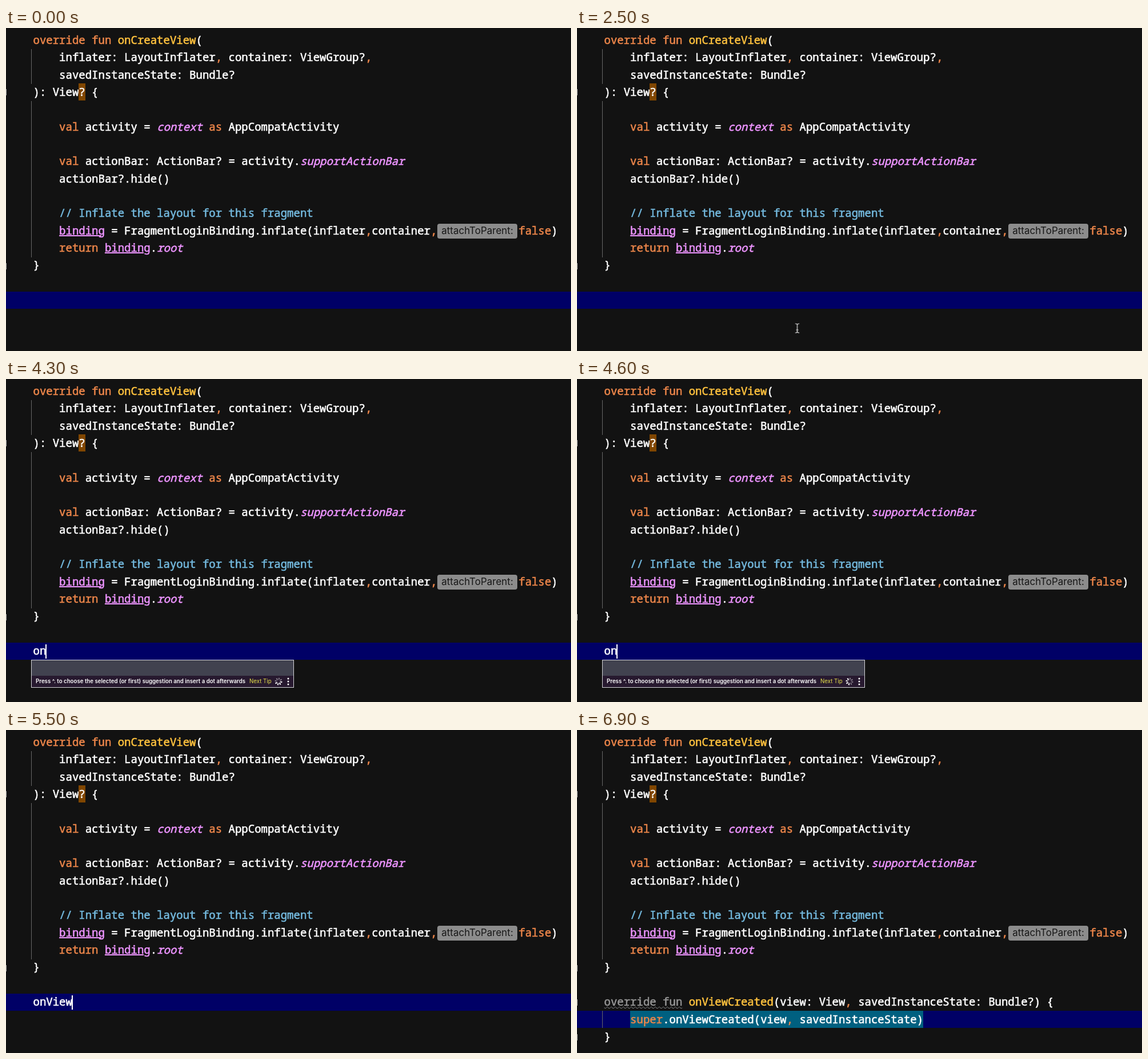
Animation, 989 px wide and 566 px high, one loop 7 s. Source, as an HTML page:

```html
<!DOCTYPE html>
<html lang="en">
<head>
<meta charset="utf-8">
<title>Typing an override</title>
<style>
  :root { --line: 30.35px; --x: 47.5px; --loop: 7s; }
  html, body { margin: 0; width: 100%; height: 100%; overflow: hidden; background: #121212; }
  #stage { position: relative; width: 989px; height: 566px; overflow: hidden; background: #121212; color: #fff; }
  #stage div, pre, .hint { position: absolute; }
  pre, .typed {
    left: var(--x); margin: 0; white-space: pre;
    font: 500 19px/var(--line) "Noto Sans Mono", "DejaVu Sans Mono", monospace;
    font-variant-ligatures: none;
    -webkit-text-stroke: .6px currentColor;
  }
  pre { top: 6px; }
  b { font-weight: inherit; color: #ed864a; }
  i { color: #ed94ff; }
  u { color: #ed94ff; text-decoration-thickness: 1.5px; text-underline-offset: 1px; }
  em { font-style: normal; color: #ffc23e; }
  s { color: #969696; text-decoration: underline wavy #8c8c8c 1px; text-underline-offset: 1px; }
  q { quotes: none; color: #74badf; }
  .match { display: inline-block; height: var(--line); vertical-align: top; background: #804600; }
  .hint {
    left: 755px; top: 343px; width: 140px; height: 26px; border-radius: 4px;
    background: #8c8c8c; color: #161616; text-align: center; white-space: nowrap;
    font: 400 17px/25px Inter, "Liberation Sans", sans-serif;
  }
  .late { left: 897.3px; top: 339.85px; }
  .guide { left: 43.5px; width: 1px; background: #666; }
  .fold { left: -6px; width: 5px; height: 9px; border: 1px solid #aaa; }
  .row { left: 0; width: 100%; height: 30px; background: #000066; }
  .sel { left: 93px; top: 492px; width: 513px; height: 30px; background: #006080; }

  .before, .after { inset: 0; }
  .before { animation: before var(--loop) step-end infinite; }
  .after { animation: after var(--loop) step-end infinite; }
  @keyframes before { 0% { visibility: visible } 81.4%, 100% { visibility: hidden } }
  @keyframes after { 0% { visibility: hidden } 81.4%, 100% { visibility: visible } }

  .typed, .added { top: 461.25px; }
  .typed::before { content: ""; animation: type var(--loop) step-end infinite; }
  .typed::after, .last { position: absolute; width: 2px; height: 25px; background: #fff; }
  .typed::after {
    content: ""; right: -1px; top: 4px;
    animation: blink var(--loop) step-end infinite;
  }
  @keyframes type {
    0% { content: "" }
    57.1% { content: "o" }
    59.9% { content: "on" }
    68.5% { content: "onV" }
    71.4% { content: "onVi" }
    77.1% { content: "onVie" }
    78.5%, 100% { content: "onView" }
  }
  @keyframes blink {
    0% { opacity: 0 }
    42.8% { opacity: 1 }
    50% { opacity: 0 }
    57.1%, 100% { opacity: 1 }
  }
  .last { left: 92px; top: 495px; animation: rest var(--loop) step-end infinite; }
  @keyframes rest { 0% { opacity: 1 } 91.4%, 100% { opacity: 0 } }

  .popup {
    left: 43.5px; top: 491.5px; width: 458.5px; height: 47px; border: 1px solid #d4d4d8;
    background: linear-gradient(#41424f 27px, #27192f 27px);
    font: 600 9.7px/20px Inter, "Liberation Sans", sans-serif; white-space: nowrap;
    animation: popup var(--loop) step-end infinite;
  }
  .popup span { position: absolute; top: 27px; left: 7.5px; }
  .popup .next { left: 381.5px; color: #e6e04a; font-weight: 400; }
  .popup svg { position: absolute; left: 424px; top: 29px; }
  .spin { transform-origin: 8px 8px; animation: spin 1s steps(8) infinite; }
  @keyframes popup { 0% { opacity: 0 } 59.9% { opacity: 1 } 71.4%, 100% { opacity: 0 } }
  @keyframes spin { to { transform: rotate(360deg) } }

  .mouse { left: 0; top: 0; animation: move var(--loop) infinite, show var(--loop) step-end infinite; }
  .mouse svg { position: absolute; overflow: visible; }
  .beam { animation: beam var(--loop) step-end infinite; }
  .arrow { animation: arrow var(--loop) step-end infinite; }
  @keyframes move {
    0%, 31.4% { transform: translate(420px, 536px); animation-timing-function: ease-in-out }
    42.8% { transform: translate(305px, 503px); animation-timing-function: ease-out }
    47% { transform: translate(290px, 486px) }
    85% { transform: translate(290px, 486px); animation-timing-function: ease-out }
    88.4% { transform: translate(401px, 521px) }
    90% { transform: translate(401px, 521px); animation-timing-function: ease-in }
    95.7%, 100% { transform: translate(440px, 580px) }
  }
  @keyframes show {
    0% { opacity: 0 }
    31.4% { opacity: 1 }
    57.1% { opacity: 0 }
    85% { opacity: 1 }
    95.7%, 100% { opacity: 0 }
  }
  @keyframes beam { 0% { opacity: 1 } 85.6% { opacity: 0 } 91.4%, 100% { opacity: 1 } }
  @keyframes arrow { 0% { opacity: 0 } 85.6% { opacity: 1 } 91.4%, 100% { opacity: 0 } }
</style>
</head>
<body>
<div id="stage">
  <div class="guide" style="top:37px;height:61px"></div>
  <div class="guide" style="top:128px;height:274px"></div>
  <div class="fold" style="top:107px"></div>
  <div class="fold" style="top:412px"></div>
<pre><b>override fun</b> <em>onCreateView</em>(
    inflater: LayoutInflater<b>,</b> container: ViewGroup?<b>,</b>
    savedInstanceState: Bundle?
): View<span class="match">?</span> {

    <b>val</b> activity = <i>context</i> <b>as</b> AppCompatActivity

    <b>val</b> actionBar: ActionBar? = activity.<i>supportActionBar</i>
    actionBar?.hide()

    <q>// Inflate the layout for this fragment</q>
    <u>binding</u> = FragmentLoginBinding.inflate(inflater<b>,</b>container<b>,</b>
    <b>return</b> <u>binding</u>.<i>root</i>
}</pre>
  <span class="hint">attachToParent:</span>
  <pre class="late"><b>false</b>)</pre>

  <div class="before">
    <div class="row" style="top:462px"></div>
    <div class="typed">&#8203;</div>
    <div class="popup">
      <span>Press ^. to choose the selected (or first) suggestion and insert a dot afterwards</span>
      <span class="next">Next Tip</span>
      <svg width="32" height="16" fill="none" stroke="#fff">
        <g class="spin" stroke-width="3.6" stroke-dasharray="1 1">
          <circle cx="8" cy="8" r="4.6" pathLength="16" opacity=".45"/>
          <path d="M8 3.4A4.6 4.6 0 0 1 8 12.6" pathLength="8"/>
        </g>
        <path d="M25 3h.01M25 8h.01M25 13h.01" stroke-width="3" stroke-linecap="round"/>
      </svg>
    </div>
  </div>

  <div class="after">
    <div class="row" style="top:492px"></div>
    <div class="sel"></div>
    <div class="guide" style="top:492px;height:30px"></div>
    <div class="fold" style="top:472px"></div>
    <div class="fold" style="top:533px"></div>
<pre class="added"><s>override fun</s> <em>onViewCreated</em>(view: View<b>,</b> savedInstanceState: Bundle?) {
    <b>super</b>.onViewCreated(view<b>,</b> savedInstanceState)
}</pre>
    <div class="last"></div>
  </div>

  <div class="mouse">
    <svg class="beam" width="1" height="1" fill="none">
      <defs><path id="ibeam" d="M-3.5-8Q0-8 0-5.5V5.5Q0 8-3.5 8M3.5-8Q0-8 0-5.5V5.5Q0 8 3.5 8M-2 3H2"/></defs>
      <use href="#ibeam" stroke="#111" stroke-width="3"/>
      <use href="#ibeam" stroke="#eee" stroke-width="1.2"/>
    </svg>
    <svg class="arrow" width="1" height="1">
      <path d="M0 0V13.5L3.2 10.6L5.3 15.6L7.6 14.6L5.5 9.8H9.6Z" fill="#111" stroke="#eee" stroke-width="1.1"/>
    </svg>
  </div>
</div>
</body>
</html>
```
